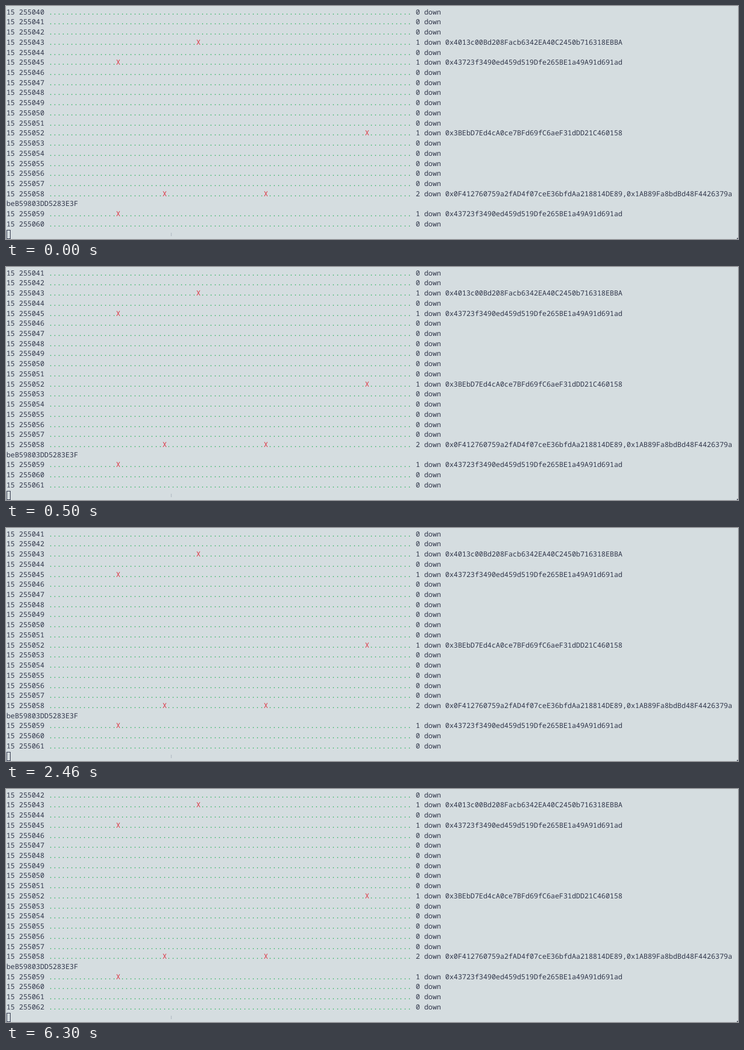
Animation, 1280 px wide and 409 px high, one loop 8000 ms. Source, as an HTML page:

```html
<!DOCTYPE html>
<html lang="en">
<head>
<meta charset="utf-8">
<title>Block monitor</title>
<style>
  html, body { margin: 0; width: 100%; height: 100%; overflow: hidden; background: #d5dde0; }
  svg { display: block; }
  text { fill: #30364a; white-space: pre; text-rendering: geometricPrecision; font-variant-ligatures: none; }
  .up { fill: #1fae54; }
  .miss { fill: #dc2f3c; }
</style>
</head>
<body>
<svg width="1280" height="409" viewBox="0 0 1280 409">
  <g id="log"></g>
  <rect x="1.5" y="393.5" width="6" height="15" fill="none" stroke="#30364a"/>
  <rect x="288.5" y="398" width="1" height="6" fill="#a9b3bc"/>
  <rect x="1278" y="407" width="2" height="2" fill="#59606c"/>
</svg>
<script>
const FONT = '"Source Code Pro", "Noto Sans Mono", "DejaVu Sans Mono", monospace';
const CELL = 7.385, LINE = 17.73, LEFT = 0.7, BASE = 14.6;
const ROWS = 22, COLS = 172, NODES = 86;
const FIRST = 255040, LAST = 255062, LOOP = 8000;
const STEPS = [500, 3760];

const REPEAT = '0x43723f3490ed459d519Dfe265BE1a49A91d691ad';
// block: [positions of missing nodes, their addresses]
const DOWN = {
  255043: [[35], '0x4013c00Bd208Facb6342EA40C2450b716318EBBA'],
  255045: [[16], REPEAT],
  255052: [[75], '0x3BEbD7Ed4cA0ce7BFd69fC6aeF31dDD21C460158'],
  255058: [[27, 51], '0x0F412760759a2fAD4f07ceE36bfdAa218814DE89,0x1AB89Fa8bdBd48F4426379abeB59803DD5283E3F'],
  255059: [[16], REPEAT]
};

const rows = [];
for (let block = FIRST; block <= LAST; block++) {
  const [missing, address] = DOWN[block] || [[], ''];
  const dots = Array.from({ length: NODES }, (_, i) => missing.includes(i) ? 'X' : '.').join('');
  const marks = dots.replace(/X/g, '<tspan class="miss">X</tspan>');
  const head = `15 ${block} `;
  const tail = ` ${missing.length} down ${address}`;
  const room = COLS - head.length - NODES;
  rows.push(`${head}<tspan class="up">${marks}</tspan>${tail.slice(0, room)}`);
  if (tail.length > room) rows.push(tail.slice(room));
}

// Choose the font size whose character advance equals one terminal cell.
const pen = document.createElement('canvas').getContext('2d');
pen.font = `100px ${FONT}`;
const size = CELL * 100 / pen.measureText('0').width;

const log = document.getElementById('log');
log.style.fontFamily = FONT;
log.style.fontSize = size + 'px';

let shown = -1;
function draw(now) {
  const t = now % LOOP;
  const top = STEPS.filter(step => t >= step).length;
  if (top !== shown) {
    shown = top;
    log.innerHTML = rows.slice(top, top + ROWS)
      .map((row, i) => `<text x="${LEFT}" y="${BASE + i * LINE}">${row}</text>`).join('');
  }
}

const start = performance.now();
function tick() {
  draw(performance.now() - start);
  requestAnimationFrame(tick);
}
tick();
</script>
</body>
</html>
```
